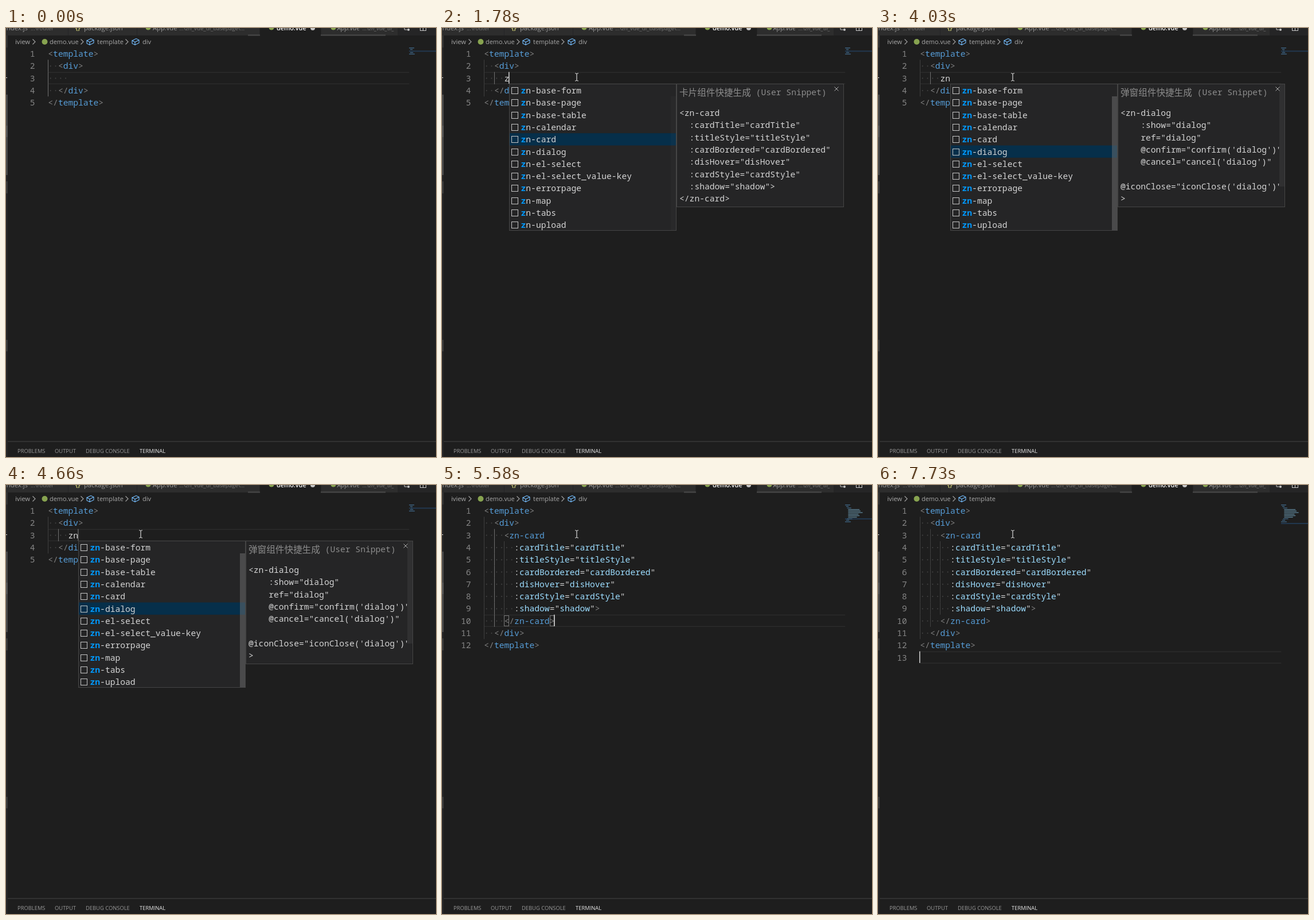
An HTML page with a canvas for the animation above (8 s loop, 750 px wide and 747 px high).

```html
<!DOCTYPE html>
<html lang="en">
<head>
<meta charset="utf-8">
<title>Snippet completion</title>
<style>
html, body { margin: 0; height: 100%; overflow: hidden; background: #1e1e1e; }
canvas { display: block; }
</style>
</head>
<body>
<canvas id="stage" width="750" height="747"></canvas>
<script>
const c = document.getElementById('stage').getContext('2d');
const MONO = '14.66px "Noto Sans Mono", monospace';
const BOLD = 'bold ' + MONO;
const CJK = '15.6px "Noto Sans CJK SC", "Noto Sans CJK", sans-serif';
const ui = (size, style = '') => `${style} ${size}px "Open Sans", sans-serif`;
const CW = 8.797, LH = 21.3, LEFT = 73.3, TOP = 34;
const GREY = '#808080', BLUE = '#569cd6', LIGHT = '#d4d4d4', ATTR = '#9cdcfe', GREEN = '#87a350';

const card = ['<zn-card', '  :cardTitle="cardTitle"', '  :titleStyle="titleStyle"',
  '  :cardBordered="cardBordered"', '  :disHover="disHover"', '  :cardStyle="cardStyle"',
  '  :shadow="shadow">', '</zn-card>'];
const dialog = ['<zn-dialog', '    :show="dialog"', '    ref="dialog"',
  '    @confirm="confirm(\'dialog\')"', '    @cancel="cancel(\'dialog\')"', '',
  '@iconClose="iconClose(\'dialog\')"', '>', '    :title="dialogTitle"'];
const items = ['base-form', 'base-page', 'base-table', 'calendar', 'card', 'dialog', 'el-select',
  'el-select_value-key', 'errorpage', 'map', 'tabs', 'upload'];

// caret blink: [start, duration, target opacity]
const blinks = [[270, 120, 1], [580, 190, 0], [1270, 190, 1], [1780, 1, 1], [2510, 190, 0],
  [3130, 120, 1], [3520, 190, 0], [4140, 120, 1], [4540, 190, 0], [5150, 120, 1],
  [5580, 1, 1], [6130, 140, 0], [6730, 1, 1], [7440, 180, 0], [7650, 1, 1]];

function rect(x, y, w, h, color) { c.fillStyle = color; c.fillRect(x, y, w, h); }
function box(x, y, w, h, color) { c.strokeStyle = color; c.lineWidth = 1; c.strokeRect(x + .5, y + .5, w, h); }
function text(s, x, y, color, font = MONO) { c.font = font; c.fillStyle = color; c.fillText(s, x, Math.round(y)); }
function dot(x, y, r, color) { c.fillStyle = color; c.beginPath(); c.arc(x, y, r, 0, 7); c.fill(); }
function line(points, color, width = 1) {
  c.strokeStyle = color;
  c.lineWidth = width;
  c.beginPath();
  for (let i = 0; i < points.length; i += 2) c.lineTo(points[i], points[i + 1]);
  c.stroke();
}
const rowTop = n => TOP + (n - 1) * LH;
const colX = n => LEFT + n * CW;

function caretAlpha(t) {
  let a = 0;
  for (const [start, length, to] of blinks)
    if (t >= start) a += (to - a) * Math.min(1, (t - start) / length);
  return a;
}

// document, caret position and breadcrumb at time t
function editorState(t) {
  const typed = t < 1780 ? '' : t < 1860 ? 'z' : 'zn';
  const body = t < 5580 ? ['    ' + typed] : card.map(s => '    ' + s);
  const lines = ['<template>', '  <div>', ...body, '  </div>', '</template>'];
  if (t >= 7650) lines.push('');
  const row = t < 5580 ? 3 : t < 6730 ? 10 : t < 6880 ? 11 : t < 7650 ? 12 : 13;
  const crumbs = ['template'];
  if (t < 6960) crumbs.push('div');
  if (t >= 5960 && t < 6730) crumbs.push('zn-card');
  return { lines, row, col: lines[row - 1].length, typed, crumbs };
}

function chevron(x) { line([x - 2.5, 19.5, x + 2, 24, x - 2.5, 28.5], '#a0a0a0', 1.2); }
function cube(x) {
  line([x - 6, 22, x + 1, 18.5, x + 6, 21, x + 6, 26, x - 1, 29.5, x - 6, 27, x - 6, 22, x - 1, 24.5, x - 1, 29.5], '#75beff', 1.1);
  line([x - 1, 24.5, x + 6, 21], '#75beff', 1.1);
}

function frame() {
  rect(0, 0, 750, 747, '#1e1e1e');
  rect(0, 0, 750, 13, '#252526');
  [[0, 108], [109, 228], [229, 442], [550, 683]].forEach(([a, b]) => rect(a, 0, b - a, 13, '#2d2d2d'));
  rect(422, 11.5, 240, 2, '#4a4a4a');
  rect(443, 0, 106, 14, '#1e1e1e');
  const dim = '#777', tab = '#999';
  text('index.js', -2, 4, tab, ui(11.3));
  text('...\\router', 43, 4, dim, ui(9.8));
  text('{}', 121, 4, '#b5b56a', ui(11, 'bold'));
  text('package.json', 136, 4, tab, ui(11.2));
  dot(248, -1, 4.5, GREEN);
  text('App.vue', 256, 4, tab, ui(11.2));
  text('...\\zn_vue_ui_basepage\\...', 302, 4, dim, ui(9.7));
  dot(463, -1, 4.5, GREEN);
  text('demo.vue', 472, 4, '#fff', ui(10.8, '600'));
  dot(535, 0, 4, '#c5c5c5');
  dot(571, -1, 4.5, GREEN);
  text('App.vue', 578, 4, tab, ui(11.2, 'italic'));
  text('...\\zn_vue_ui_', 622, 4, dim, ui(9.7, 'italic'));
  line([695, 0, 695, 3, 700, 3], '#c5c5c5');
  dot(702, 3, 2, '#c5c5c5');
  box(722, -5, 10, 9, '#c5c5c5');
  line([727.5, 0, 727.5, 4], '#c5c5c5');

  rect(0, 13, 3, 734, '#252526');
  rect(0, 13, 3, 21, '#333');
  rect(0, 116, 3, 140, '#484848');
  rect(0, 170, 3, 20, '#555');
  rect(0, 267, 3, 21, '#3a3a3a');
  rect(0, 543, 3, 20, '#3a3a3a');
  rect(0, 86, 2, 1, '#ddd');

  rect(3, 719.5, 747, 1, '#444');
  [['PROBLEMS', 20], ['OUTPUT', 85], ['DEBUG CONSOLE', 139], ['TERMINAL', 233]].forEach(([s, x], i) =>
    text(s, x, 740, i == 3 ? '#e7e7e7' : '#9a9a9a', ui(9.4)));
}

function breadcrumb(crumbs) {
  text('iview', 16, 28, '#a9a9a9', ui(11.2));
  chevron(49);
  dot(67.5, 24, 5, GREEN);
  text('demo.vue', 76, 28, '#a9a9a9', ui(10.9));
  [[133, 147, 159], [211, 226, 238], [262, 276, 288]].slice(0, crumbs.length).forEach(([a, b, x], i) => {
    chevron(a);
    cube(b);
    text(crumbs[i], x, 28, '#a9a9a9', ui(i == 2 ? 10.2 : 11));
  });
}

function codeLine(s, n) {
  const y = rowTop(n), base = y + 16;
  const indent = s.search(/\S|$/);
  for (let i = 0; i < indent; i++) dot(colX(i + .5), y + 11, 1, '#454545');
  const markup = /[<:]/.test(s);
  let afterBracket = false;
  for (const m of s.matchAll(/<\/?|>|[:="]|[\w-]+/g)) {
    const bracket = /[<>]/.test(m[0]);
    const color = bracket ? GREY : !markup || /[:="]/.test(m[0]) ? LIGHT : afterBracket ? BLUE : ATTR;
    text(m[0], colX(m.index), base, color);
    afterBracket = bracket;
  }
}

function guides(lines, row) {
  const depth = lines.map(s => s.trim() ? s.search(/\S/) : s ? 2 : 0);
  const n = lines.length;
  const onLastTag = row == 12;
  const activeCol = onLastTag ? 0 : depth[row - 1] - 2;
  let from = onLastTag ? 11 : row, to = from;
  while (from > 1 && depth[from - 2] > activeCol) from--;
  while (to < n && depth[to] > activeCol) to++;
  depth.forEach((d, i) => {
    for (let k = 0; k < d; k += 2) {
      const active = k == activeCol && i + 1 >= from && i + 1 <= to;
      rect(Math.round(colX(k)), rowTop(i + 1), 1, LH, active ? '#707070' : '#404040');
    }
  });
}

function minimap(lines, row) {
  const y = n => 34 + (n - 1) * 2.67;
  rect(703, y(row), 47, 2, '#22384f');
  lines.forEach((s, i) => {
    const indent = s.search(/\S|$/);
    const attr = s.includes('=');
    rect(703 + indent * .9, y(i + 1), (s.length - indent) * .9, 1.4, attr ? '#5c8296' : '#3d6280');
  });
}

function editor(s, t) {
  const y = rowTop(s.row);
  rect(LEFT, y, 630, 1.4, '#2c2c2c');
  rect(LEFT, y + LH - 1.4, 630, 1.4, '#2c2c2c');
  guides(s.lines, s.row);
  s.lines.forEach((code, i) => {
    c.textAlign = 'right';
    text(i + 1, 50.5, rowTop(i + 1) + 16, '#858585');
    c.textAlign = 'left';
    codeLine(code, i + 1);
  });
  const code = s.lines[s.row - 1];
  if (code.endsWith('>'))
    [code.indexOf('<'), s.col - 1].forEach(k => box(Math.round(colX(k)), Math.round(y) + 1, 8, 18, '#777'));
  minimap(s.lines, s.row);
  c.globalAlpha = caretAlpha(t);
  rect(Math.round(colX(s.col)) - 1, y, 1.6, LH - 1, '#c8c8c8');
  c.globalAlpha = 1;
}

function suggestions(typed, t) {
  const x = Math.round(colX(4 + typed.length)), top = 98;
  const onDialog = t >= 4030 && t < 5190;
  const chosen = onDialog ? 5 : 4;
  rect(x, top, 292, 255, '#252526');
  rect(x + 1, top + chosen * LH, 290, LH, '#062f4a');
  items.forEach((name, i) => {
    const y = top + i * LH;
    box(x + 4, Math.round(y + 5), 11, 11, '#c5c5c5');
    text(typed, x + 20.5, y + 16, '#0097fb', BOLD);
    text('zn-'.slice(typed.length) + name, x + 20.5 + typed.length * CW, y + 16, LIGHT);
  });
  const shade = Math.min(1, .1 + Math.max(0, t - 1780) / 180);
  rect(x + 282, 119, 9, 233, `rgba(121, 121, 121, ${.45 * shade})`);
  box(x, top - 1, 291, 255, '#454545');

  const left = x + 292;
  rect(left, top, 291, 213, '#252526');
  c.save();
  c.beginPath();
  c.rect(left, top, 291, 213);
  c.clip();
  const title = onDialog ? '弹窗组件快捷生成' : '卡片组件快捷生成';
  text(title, left + 5, 118, '#8c8c8c', CJK);
  text(' (User Snippet)', left + 5 + 8 * 15.6, 117, '#8c8c8c');
  (onDialog ? dialog : card).forEach((s, i) => text(s, left + 5, 153 + i * LH, LIGHT));
  if (onDialog) rect(left + 282, 98, 9, 178, '#303031');
  c.restore();
  box(left, top - 1, 291, 214, '#454545');
  const cx = left + 279;
  line([cx - 3.5, 102.5, cx + 3.5, 109.5], '#b0b0b0');
  line([cx + 3.5, 102.5, cx - 3.5, 109.5], '#b0b0b0');
}

function pointer(t) {
  if (t < 150) return;
  const p = Math.min(1, Math.floor((t - 150) / 77.5) / 7);
  const ease = p * p * (3 - 2 * p);
  const x = 660 - 425 * ease;
  const y = 698 - 612.5 * ease - 40 * p * p * p * (1 - p);
  line([x - 3, y - 6.5, x - 1, y - 6.5, x, y - 5.5, x + 1, y - 6.5, x + 3, y - 6.5], '#d8d8d8');
  line([x - 3, y + 6.5, x - 1, y + 6.5, x, y + 5.5, x + 1, y + 6.5, x + 3, y + 6.5], '#d8d8d8');
  line([x, y - 6, x, y + 6], '#d8d8d8', 1.2);
}

function draw() {
  const t = performance.now() % 8000;
  const s = editorState(t);
  frame();
  breadcrumb(s.crumbs);
  editor(s, t);
  if (t >= 1780 && t < 5580) suggestions(s.typed, t);
  pointer(t);
  requestAnimationFrame(draw);
}
draw();
</script>
</body>
</html>
```
